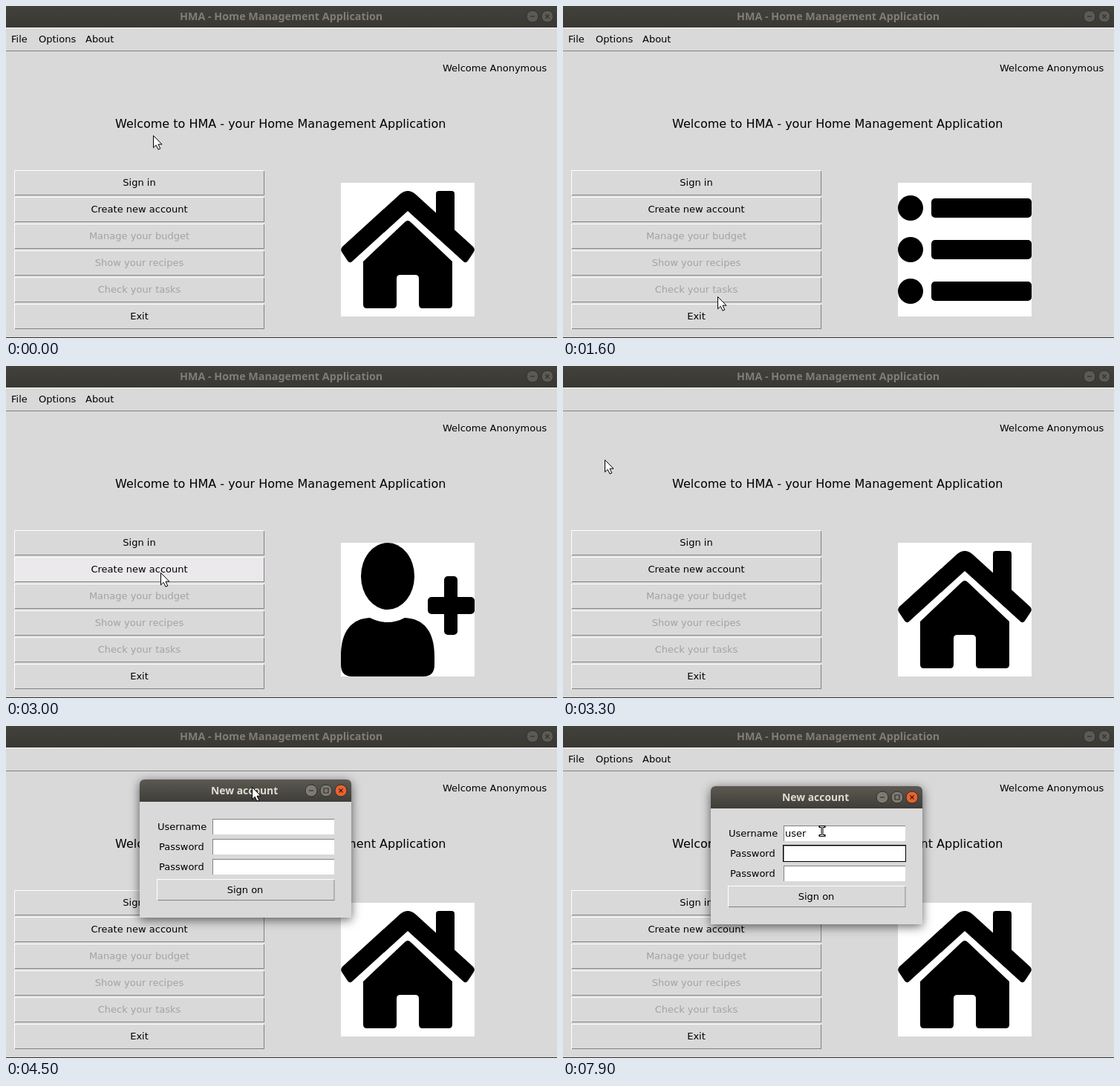
Write an HTML page that moves like this. It is 742x447 px and loops after 8 s.

```html
<!DOCTYPE html>
<html lang="en">
<head>
<meta charset="utf-8">
<title>Home Management Application</title>
<style>
html, body { margin: 0; width: 100%; height: 100%; overflow: hidden; background: #d9d9d9; }
svg { display: block; font: 13px "DejaVu Sans", sans-serif; }
.title { font: bold 14.3px "Noto Sans", "Open Sans", sans-serif; }
.dialog { filter: drop-shadow(0 3px 7px rgba(0, 0, 0, .6)); }
</style>
</head>
<body>
<svg id="stage" width="742" height="447" viewBox="0 0 742 447"></svg>
<script>
const LOOP = 8000, STEP = 100;
const BG = '#d9d9d9', GRAY = '#828282', ACTIVE = '#ebe9ec';
const BUTTONS = ['Sign in', 'Create new account', 'Manage your budget',
  'Show your recipes', 'Check your tasks', 'Exit'];
const USER = 'user';

// time, x, y of the pointer tip
const POINTER = [
  [0, 198, 174], [200, 198, 174], [400, 199, 190], [600, 205, 233], [900, 211, 272],
  [1100, 214, 305], [1400, 212, 372], [1500, 212, 372], [1600, 208, 391], [1800, 208, 408],
  [1900, 208, 408], [2000, 209, 385], [2200, 210, 318], [2300, 209, 293], [2400, 209, 283],
  [2500, 209, 283], [2600, 208, 278], [3100, 208, 278], [3400, -20, 50]
];

const rect = (x, y, w, h, fill, rx = 0) =>
  `<rect x="${x}" y="${y}" width="${w}" height="${h}" rx="${rx}" fill="${fill}"/>`;
const path = (d, attrs = '') => `<path d="${d}" ${attrs}/>`;
const text = (x, y, s, attrs = '') => `<text x="${x}" y="${y}" ${attrs}>${s}</text>`;
const bevel = (x, y, w, h, light, dark, fill) =>
  rect(x, y, w, h, light) + rect(x + 1, y + 1, w - 1, h - 1, dark) + rect(x + 1, y + 1, w - 2, h - 2, fill);

const pen = document.createElement('canvas').getContext('2d');
pen.font = '13px "DejaVu Sans", sans-serif';

const HEAD = '<ellipse cx="514" cy="283" rx="36" ry="45"/>' +
  path('M451 390C451 358 465 340 490 339Q514 351 537 339C563 340 577 358 577 390V402Q577 418 562 418H466Q451 418 451 402Z');
const HOME =
  path('M453 324L531 253Q541 245 551 253L629 324Q632 327 630 331L622 343Q619 347 616 344L541 276L466 344Q463 347 460 343L452 331Q450 327 453 324Z') +
  path('M579 282V253Q579 249 583 249H600Q604 249 604 253V306Z') +
  path('M481 344L537 291Q541 287 545 291L601 344V402Q601 407 596 407H561Q556 407 556 402V367Q556 362 551 362H531Q526 362 526 367V402Q526 407 521 407H486Q481 407 481 402Z');
const MONEY =
  path('M509 238H574Q585 240 580 249L564 272H519L502 249Q497 240 509 238Z') +
  path('M519 283H564C600 303 631 345 631 382Q631 418 594 418H488Q451 418 451 382C451 345 483 303 519 283Z') +
  path('M558 331C553 326 547 325 541 325C530 325 525 331 525 337C525 352 558 346 558 363C558 372 550 377 541 377C534 377 528 375 524 371',
    'fill="none" stroke="#fff" stroke-width="12" stroke-linecap="round"') +
  rect(535, 311, 12, 16, '#fff', 4) + rect(535, 374, 12, 16, '#fff', 4) + rect(547, 381, 84, 1, '#555');
const LIST = [272, 328, 384].map(y =>
  `<circle cx="468" cy="${y}" r="17"/>` + rect(496, y - 13, 135, 26, '#000', 5)).join('');
const CUTLERY =
  path('M478 238V280Q478 302 496 304V410M514 238V280Q514 302 496 304M496 238V304',
    'fill="none" stroke="#000" stroke-width="12"') +
  path('M604 238Q562 250 562 330H588V418H604Z');
const LEAVE =
  path('M520 268H474Q459 268 459 283V373Q459 388 474 388H520', 'fill="none" stroke="#000" stroke-width="16"') +
  path('M506 308H560V270L626 328L560 386V348H506Z');
const ICONS = [
  `<g transform="translate(27 0)">${HEAD}</g>`,
  HEAD + rect(590, 283, 18, 79, '#000', 5) + rect(568, 311, 63, 23, '#000', 5),
  MONEY, CUTLERY, LIST, LEAVE
];

function track(keys, t) {
  const i = keys.findIndex(k => k[0] > t);
  if (i < 0) return keys[keys.length - 1].slice(1);
  const [a, b] = [keys[i - 1], keys[i]], k = (t - a[0]) / (b[0] - a[0]);
  return [1, 2].map(n => Math.round(a[n] + (b[n] - a[n]) * k));
}

const arrow = (x, y) => path('M.5 .5V16.8L4.2 13.3L7 19.2L9.8 18L7 12.2H12Z',
  `transform="translate(${x} ${y})" fill="#fff" stroke="#000"`);

function beam(x, y) {
  const d = `M${x - 3} ${y - 6}H${x + 3}M${x - 3} ${y + 6}H${x + 3}M${x} ${y - 6}V${y + 6}`;
  return path(d, 'stroke="#000" stroke-width="3" stroke-linecap="square"') + path(d, 'stroke="#fff"');
}

function winButton(x, y, sign, fill, ink) {
  const d = { min: 'M-3 0H3', max: 'M-3 -3H3V3H-3Z', close: 'M-2.5 -2.5L2.5 2.5M2.5 -2.5L-2.5 2.5' }[sign];
  return `<g transform="translate(${x} ${y})"><circle r="8" fill="${fill}" stroke="#302f2b"/>` +
    path(d, `fill="none" stroke="${ink}" stroke-width="1.2"`) + '</g>';
}

function mainWindow(t, hover) {
  const focus = t >= 2800 && t < 3000;
  const menu = t < 3300 || t >= 4600;
  let s = rect(0, 0, 742, 447, BG) + rect(0, 0, 742, 29, `url(#${focus ? 'lit' : 'dim'})`) +
    text(234, 19, 'HMA - Home Management Application', `class="title" fill="${focus ? '#dfdbd2' : '#807d76'}"`) +
    winButton(709, 14, 'min', focus ? '#7d7a71' : '#5c5a55', '#32312d') +
    winButton(729, 14, 'close', focus ? '#e9622f' : '#5c5a55', '#32312d') +
    rect(0, 29, 742, 1, '#fff') + rect(0, 60, 742, 1, GRAY) + rect(0, 446, 742, 1, '#33322e');
  if (menu) s += text(7, 49, 'File') + text(44, 49, 'Options') + text(107, 49, 'About');
  s += text(588, 88, 'Welcome Anonymous') +
    text(147, 164, 'Welcome to HMA - your Home Management Application', 'font-size="16"');
  BUTTONS.forEach((label, i) => {
    const y = 221 + 36 * i, off = i > 1 && i < 5, down = focus && i === hover;
    s += bevel(11, y, 337, 34, down ? GRAY : '#fff', down ? '#fff' : GRAY, i === hover && !off ? ACTIVE : BG) +
      text(179.5, y + 21, label, `text-anchor="middle" fill="${off ? '#a3a3a3' : '#000'}"`);
  });
  return s + rect(451, 238, 180, 180, '#fff') + (ICONS[hover] || HOME);
}

function entry(y, focus) {
  return rect(296, y, 166, 23, focus ? '#000' : BG) + bevel(297, y + 1, 164, 21, GRAY, '#fff', '#fff');
}

function dialog(t, dx, dy) {
  const typed = USER.slice(0, [5800, 5900, 6100, 6200].filter(k => t >= k).length);
  const field = t < 5000 ? -1 : t < 7300 ? 0 : 1;
  const blink = (t >= 5600 && t < 5900) || (t >= 6500 && t < 6800) || t >= 7900;
  let s = path('M199 111V88Q199 81 206 81H477Q484 81 484 88V111Z', 'fill="url(#lit)"') +
    rect(199, 111, 285, 156, BG) +
    text(295, 101, 'New account', 'class="title" style="font-size:13.9px" fill="#dfdbd2"') +
    winButton(430, 96, 'min', '#7d7a71', '#32312d') + winButton(450, 96, 'max', '#7d7a71', '#32312d') +
    winButton(470, 96, 'close', '#e9622f', '#3c2012') +
    text(223, 149, 'Username') + text(225, 176, 'Password') + text(225, 203, 'Password');
  for (let i = 0; i < 3; i++) s += entry(133 + 27 * i, i === field);
  s += text(299, 149, typed) + bevel(222, 215, 239.5, 29, '#fff', GRAY, BG) +
    text(341, 234, 'Sign on', 'text-anchor="middle"');
  if (field >= 0 && !blink) {
    const w = field ? 0 : Math.round(pen.measureText(typed).width);
    s += rect(298 + w, 136 + 27 * field, 2, 17, '#000');
  }
  return `<g class="dialog" transform="translate(${dx} ${dy})">${s}</g>`;
}

const DEFS = '<defs>' + [['dim', '#42413c', '#393833'], ['lit', '#5b5951', '#3e3d38']].map(([id, a, b]) =>
  `<linearGradient id="${id}" x2="0" y2="1"><stop stop-color="${a}"/><stop offset="1" stop-color="${b}"/></linearGradient>`).join('') + '</defs>';

function scene(t) {
  const [x, y] = track(POINTER, t);
  const row = Math.floor((y - 221) / 36);
  const over = x >= 11 && x < 348 && y >= 221 && (y - 221) % 36 < 34;
  let s = DEFS + mainWindow(t, over ? row : -1);
  if (t < 4200) return s + arrow(x, y);

  // the dialog is dragged in by its title bar
  const left = Math.max(0, 1 - (t - 4200) / 400) ** 2;
  const dx = Math.round(-304 * left), dy = Math.round(-137 * left);
  s += dialog(t, dx, dy);
  if (t < 4800) return s + arrow(350 + dx, 91 + dy);
  if (t < 4900) return s + arrow(350, 114);
  return s + beam(349, t < 5200 ? 145 : t < 5300 ? 143 : 141.5);
}

const stage = document.getElementById('stage');
let shown = -1;
function frame() {
  const t = Math.floor(performance.now() % LOOP / STEP) * STEP;
  if (t !== shown) stage.innerHTML = scene(shown = t);
  requestAnimationFrame(frame);
}
frame();
</script>
</body>
</html>
```
